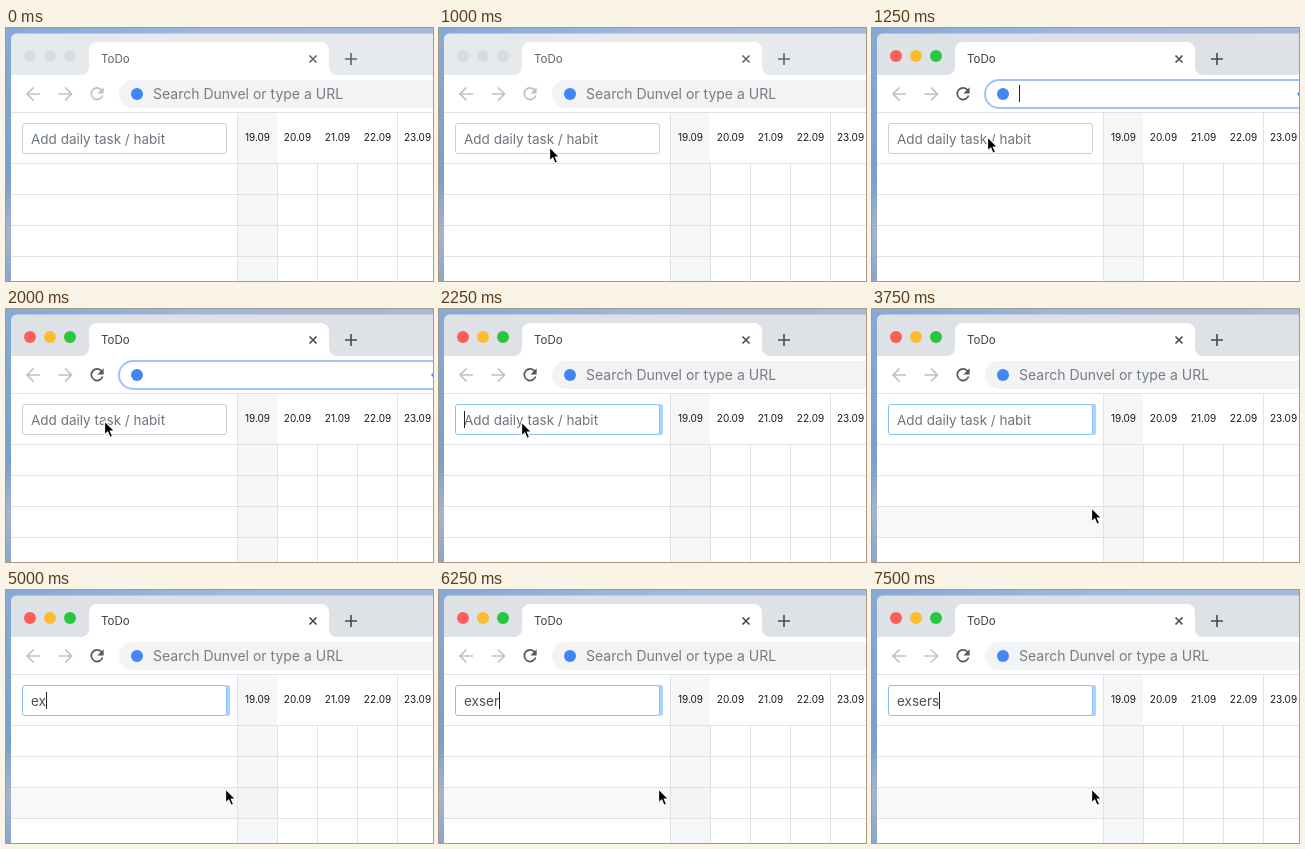
Write an HTML page that moves like this. It is 427 by 253 pixels and loops after 8 s.

```html
<!DOCTYPE html>
<html lang="en">
<head>
<meta charset="utf-8">
<title>ToDo</title>
<style>
  html, body { margin: 0; width: 100%; height: 100%; overflow: hidden; }
  svg { display: block; width: 427px; height: 253px; font-family: Inter, "Open Sans", sans-serif; }
  .frame { fill: #e7eaed; }
  .light { fill: #d9dbde; }
  .title { font-size: 11.5px; fill: #5f6368; }
  .icon { fill: none; stroke: #bdc1c6; stroke-width: 1.7; }
  .glyph { fill: none; stroke: #5f6368; stroke-width: 1.6; }
  .head { fill: #bdc1c6; }
  .omni { fill: #f1f3f4; stroke: none; }
  .hint { font-size: 14px; fill: #787c81; }
  .star { fill: #4285f4; visibility: hidden; }
  .line { fill: none; stroke: #dfe2e6; }
  .today { fill: #f5f6f8; }
  .date { font-size: 10px; fill: #15181b; text-anchor: middle; }
  .field { fill: #fff; stroke: #c9cedb; }
  .ring { fill: #a9d4ff; visibility: hidden; }
  .entry { font-size: 13.5px; fill: #6c757d; }
  .entry.typed { fill: #495057; }
  .active .frame { fill: #dee1e6; }
  .active .light { fill: var(--c); }
  .active .title { fill: #3c4043; }
  .active .reload { stroke: #54585d; }
  .active .reload.head { fill: #54585d; stroke: none; }
  .active .glyph { stroke: #45494d; }
  .address .omni { fill: #fff; stroke: #a0c2fa; stroke-width: 2; }
  .address .hint { visibility: hidden; }
  .address .star { visibility: visible; }
  .task .field { stroke: #86bffb; }
  .task .ring { visibility: visible; }
</style>
</head>
<body>
<svg id="stage" viewBox="0 0 427 253">
  <defs>
    <linearGradient id="skyTop">
      <stop offset="0" stop-color="#86a9d5"/>
      <stop offset=".5" stop-color="#9db8dc"/>
      <stop offset="1" stop-color="#a6b9d8"/>
    </linearGradient>
    <linearGradient id="skySide" x2="0" y2="1">
      <stop offset="0" stop-color="#86a9d5"/>
      <stop offset=".6" stop-color="#7b9fcd"/>
      <stop offset=".8" stop-color="#a3b5cf"/>
      <stop offset="1" stop-color="#8ba6ca"/>
    </linearGradient>
  </defs>

  <rect width="427" height="253" fill="url(#skyTop)"/>
  <rect y="5" width="6" height="248" fill="url(#skySide)"/>

  <path class="frame" d="M5 253V11a5.500 5.500 0 0 1 5.500-5.500H427V253z"/>
  <circle class="light" cx="24" cy="28" r="6" style="--c:#fb5f57"/>
  <circle class="light" cx="44" cy="28" r="6" style="--c:#fdbc2e"/>
  <circle class="light" cx="64" cy="28" r="6" style="--c:#2ac640"/>
  <path fill="#fff" d="M5 253V47H75a8 8 0 0 0 8-8V22a8 8 0 0 1 8-8H315a8 8 0 0 1 8 8V39a8 8 0 0 0 8 8H427V253z"/>
  <text class="title" x="95" y="35">ToDo</text>
  <path class="glyph" d="M303.500 27.500l7 7m0-7l-7 7M339 31h12m-6-6v12"/>

  <path class="icon" d="M34 66H21.500M27.500 59.500L21 66l6.500 6.500"/>
  <path class="icon" d="M52.500 66H65M59 59.500L65.500 66 59 72.500"/>
  <path class="icon reload" d="M95.700 62.200A5.800 5.800 0 1 0 96.600 67.500"/>
  <path class="head reload" d="M97.600 59.300v6.200h-6.200z"/>
  <rect class="omni" x="113" y="52" width="340" height="28" rx="14"/>
  <circle cx="131" cy="66" r="6" fill="#4285f4"/>
  <text class="hint" x="147" y="71">Search Dunvel or type a URL</text>
  <path class="star" d="M427 64v4l-2-2z"/>

  <rect class="today" x="232" y="85" width="39" height="168"/>
  <g id="hover">
    <rect x="5" y="198" width="226" height="30" fill="#f7f8f9"/>
    <rect x="232" y="198" width="39" height="30" fill="#f2f4f6"/>
  </g>
  <path class="line" d="M5 84.500H427M5 135.500H427M5 166.500H427M5 197.500H427M5 228.500H427
    M231.500 85V253M271.500 135V253M311.500 135V253M351.500 135V253M391.500 85V253"/>
  <g id="dates"></g>

  <rect class="ring" x="219" y="95" width="5" height="31" rx="2"/>
  <rect class="field" x="16.500" y="95.500" width="204" height="30" rx="2.500"/>
  <text class="entry" id="entry" x="25" y="116"></text>
  <rect id="caret" width="1" height="17" fill="#222"/>

  <path id="pointer" fill="#000" stroke="#fff" stroke-width="1.100"
    d="M.6 1V14.800L3.700 11.900 6 17.300 8.600 16.200 6.300 11H10.600z"/>
</svg>
<script>
const $ = id => document.getElementById(id);
const LOOP = 8000;
const PLACEHOLDER = "Add daily task / habit";

// Each row: start time in ms, then the values held from there on.
const pointerSteps = [
  [0, null], [750, 98, 197], [1000, 110, 118], [1250, 115, 108],
  [2000, 98, 111], [2250, 82, 112], [2750, 88, 118], [3000, 219, 198]
];
const modeSteps = [[0, ""], [1250, "active address"], [2250, "active task"]];
const textSteps = [
  [0, ""], [4250, "e"], [5000, "ex"], [5750, "exs"],
  [6000, "exse"], [6250, "exser"], [7500, "exsers"]
];
const caretSteps = [
  [0, null], [1250, 147, 57], [1750, null], [2250, 25, 102], [2750, null],
  [3250, 25, 102], [3750, null], [4250, 33, 102], [4750, null],
  [5000, 40, 102], [5500, null], [5750, 47, 102], [6000, 55, 102],
  [6250, 60, 102], [6750, null], [7250, 60, 102], [7500, 67, 102]
];

const at = (steps, t) => steps.findLast(step => step[0] <= t).slice(1);

function place(el, [x, y]) {
  const shown = x !== null;
  el.setAttribute("visibility", shown ? "visible" : "hidden");
  if (shown) el.setAttribute("transform", `translate(${x} ${y})`);
}

function draw(t) {
  const [typed] = at(textSteps, t);
  $("stage").setAttribute("class", at(modeSteps, t)[0]);
  $("entry").textContent = typed || PLACEHOLDER;
  $("entry").classList.toggle("typed", typed !== "");
  $("hover").setAttribute("visibility", t >= 3000 ? "visible" : "hidden");
  place($("caret"), at(caretSteps, t));
  place($("pointer"), at(pointerSteps, t));
}

for (let i = 0; i < 5; i++) {
  const label = document.createElementNS("http://www.w3.org/2000/svg", "text");
  label.setAttribute("class", "date");
  label.setAttribute("x", 251.5 + 40 * i);
  label.setAttribute("y", 113);
  label.textContent = `${19 + i}.09`;
  $("dates").append(label);
}

const start = performance.now();
function tick() {
  draw((performance.now() - start) % LOOP);
  requestAnimationFrame(tick);
}
tick();
</script>
</body>
</html>
```
